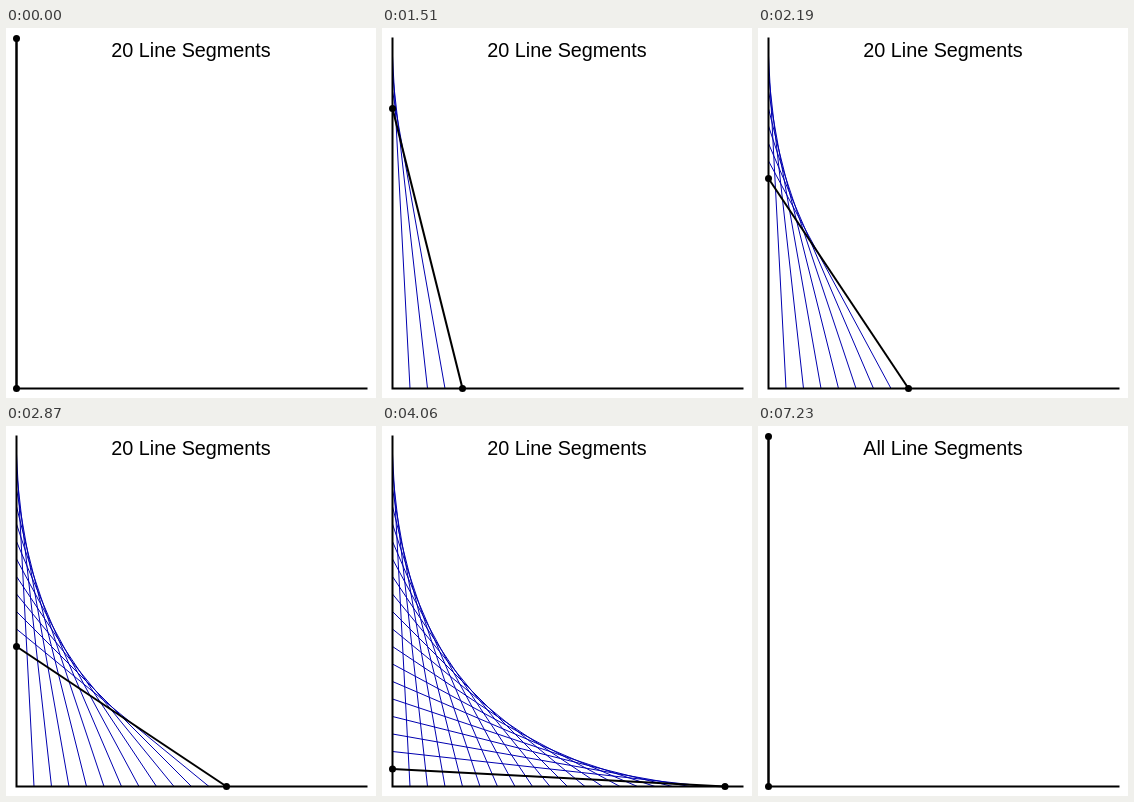
Write an HTML page that moves like this. It is 370 by 370 pixels and loops after 8000 ms.

```html
<!DOCTYPE html>
<html lang="en">
<head>
<meta charset="utf-8">
<title>Line Segments</title>
<style>
  html, body { margin: 0; width: 100%; height: 100%; overflow: hidden; background: #fff; }
  svg { display: block; width: 370px; height: 370px; }
  text { font: 19.8px "Liberation Sans", Arial, sans-serif; text-anchor: middle; }
  path, line { fill: none; stroke: #000; stroke-width: 2; stroke-linecap: square; }
  #web line { stroke: #0000b0; stroke-width: 1; stroke-linecap: butt; }
  #mover line { stroke-linecap: butt; }
  #curve { stroke: #b00000; stroke-width: 3; }
</style>
</head>
<body>
<svg viewBox="0 0 370 370">
  <g id="web"></g>
  <path d="M10.5 10.5V360.5H360.5"/>
  <g id="mover">
    <line/>
    <circle r="3.5"/>
    <circle r="3.5"/>
  </g>
  <path id="curve" d="M10.5 10.5Q10.5 360.5 360.5 360.5"/>
  <text x="185" y="29"></text>
</svg>
<script>
  const LOOP = 8000, START = 1000, STEP = 170, COUNT = 20;
  const CURVE_AT = 5230, RESET_AT = 7230;
  const LOW = 10.5, HIGH = 360.5;

  const web = document.getElementById('web');
  const mover = document.getElementById('mover');
  const curve = document.getElementById('curve');
  const title = document.querySelector('text');
  const [segment, dotY, dotX] = mover.children;

  function set(el, attrs) {
    for (const name in attrs) el.setAttribute(name, attrs[name]);
  }

  function show(el, on) {
    el.style.display = on ? '' : 'none';
  }

  // One end slides down the vertical axis while the other slides right.
  function placeLine(el, k) {
    const pos = LOW + (HIGH - LOW) * k / COUNT;
    set(el, { x1: LOW, y1: pos, x2: pos, y2: HIGH });
    return pos;
  }

  for (let k = 1; k < COUNT; k++) {
    const line = document.createElementNS('http://www.w3.org/2000/svg', 'line');
    placeLine(line, k);
    web.append(line);
  }

  function draw(t) {
    const reset = t >= RESET_AT;
    const done = t >= CURVE_AT && !reset;
    const step = reset || t < START
      ? 0
      : Math.min(COUNT, Math.floor((t - START) / STEP) + 1);

    const pos = placeLine(segment, step);
    set(dotY, { cx: LOW, cy: pos });
    set(dotX, { cx: pos, cy: HIGH });
    [...web.children].forEach((line, i) => show(line, i + 1 < step));
    show(mover, !done);
    show(curve, done);
    title.textContent = (reset ? 'All' : COUNT) + ' Line Segments';
  }

  const origin = performance.now();
  function tick() {
    draw((performance.now() - origin) % LOOP);
    requestAnimationFrame(tick);
  }
  tick();
</script>
</body>
</html>
```
